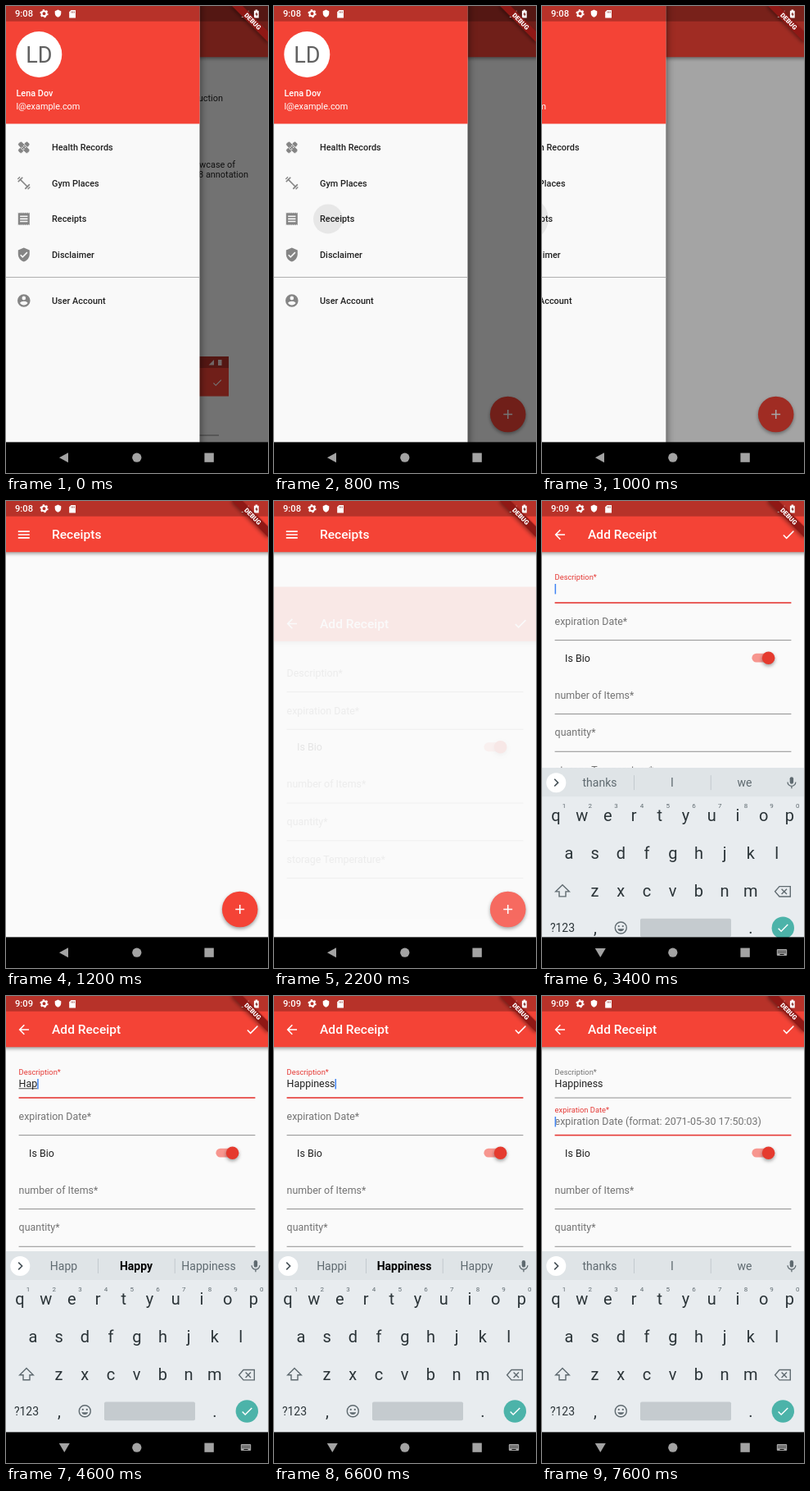
These frames come from a looping animation (320x569 px, 8000 ms). An HTML page:

```html
<!DOCTYPE html>
<html lang="en">
<head>
<meta charset="utf-8">
<title>Receipts app</title>
<style>
html, body { margin: 0; width: 100%; height: 100%; overflow: hidden; background: #000; }
svg { display: block; width: 100%; height: 100%; font-family: Roboto, sans-serif; }
text { white-space: pre; }
.shade { filter: drop-shadow(0 2px 2px rgba(0,0,0,.38)); }
.side { filter: drop-shadow(1px 0 5px rgba(0,0,0,.5)); }
</style>
</head>
<body>
<svg id="stage" viewBox="0 0 320 569"></svg>
<script>
const LOOP = 8000, STEP = 200;
const RED = '#f44336', PAPER = '#fafafa', INK = '#212121', GREY = '#737373', RULE = '#858585';
const LABEL = 12.44, SMALL = 9.33, DRAWER = 236.5;

const stage = document.getElementById('stage');
const $ = id => document.getElementById(id);
const set = (id, attrs) => { for (const k in attrs) $(id).setAttribute(k, attrs[k]); };
const show = (id, on) => set(id, { display: on ? 'inline' : 'none' });

const rect = (x, y, w, h, fill, more = '') => `<rect x="${x}" y="${y}" width="${w}" height="${h}" fill="${fill}" ${more}/>`;
const disc = (x, y, r, fill, more = '') => `<circle cx="${x}" cy="${y}" r="${r}" fill="${fill}" ${more}/>`;
const path = (d, fill, more = '') => `<path d="${d}" fill="${fill}" ${more}/>`;
const line = (d, color, width, more = '') => path(d, 'none', `stroke="${color}" stroke-width="${width}" ${more}`);
const text = (x, y, size, str, fill = INK, more = '') => `<text x="${x}" y="${y}" font-size="${size}" fill="${fill}" ${more}>${str}</text>`;
const MID = 'text-anchor="middle"', END = 'text-anchor="end"', MEDIUM = 'font-weight="500"';

// 24-unit icons, placed by their centre
const ICONS = {
  menu: 'M3 18h18v-2H3zm0-5h18v-2H3zm0-7v2h18V6z',
  back: 'M20 11H7.83l5.59-5.59L12 4l-8 8 8 8 1.41-1.41L7.83 13H20z',
  check: 'M9 16.17L4.83 12l-1.42 1.41L9 19 21 7l-1.41-1.41z',
  add: 'M19 13h-6v6h-2v-6H5v-2h6V5h2v6h6z',
  shield: 'M12 1L3 5v6c0 5.55 3.84 10.74 9 12 5.16-1.26 9-6.45 9-12V5z',
  verified: 'M12 1L3 5v6c0 5.55 3.84 10.74 9 12 5.16-1.26 9-6.45 9-12V5zm-2 16l-4-4 1.41-1.41L10 14.17l6.59-6.59L18 9z',
  receipt: 'M18 17H6v-2h12zm0-4H6v-2h12zm0-4H6V7h12zM3 22' + 'l1.5-1.5 1.5 1.5'.repeat(6) + 'V2' + 'l-1.5 1.5-1.5-1.5'.repeat(6) + 'z',
  account: 'M12 2a10 10 0 1 0 0 20 10 10 0 0 0 0-20zm0 3a3 3 0 1 1 0 6 3 3 0 0 1 0-6zm0 14.2c-2.5 0-4.71-1.28-6-3.22.03-1.99 4-3.08 6-3.08s5.97 1.09 6 3.08c-1.29 1.94-3.5 3.22-6 3.22z'
};
const place = (x, y, k, inner) => `<g transform="translate(${x} ${y}) scale(${k}) translate(-12 -12)">${inner}</g>`;
const icon = (name, x, y, fill = '#fff', k = .778) => place(x, y, k, path(ICONS[name], fill, 'fill-rule="evenodd"'));

const gear = disc(46.5, 9.2, 3, 'none', 'stroke="#fff" stroke-width="2"') +
  disc(46.5, 9.2, 4.4, 'none', 'stroke="#fff" stroke-width="1.5" stroke-dasharray="2.1 2.508"');

function statusIcons() {
  return gear + icon('shield', 63.5, 9.2, '#fff', .42) +
    path('M79.5 5h5.5v9.5h-7.8V7.3z', '#fff') + line('M80 6.5v2M81.7 6.5v2M83.4 6.5v2', '#8a2a22', .7) +
    path('M296.5 5v9h-9z', '#fff', 'opacity=".45"') + path('M293 8.5v5.5h-5.5z', '#fff') +
    path('M304.5 4.5h2.6v1.2h1.6v8.8h-5.8V5.7h1.6z', '#fff') +
    path('M306.3 7l-2 3.6h1.4V13l2.1-3.6h-1.5z', '#7a2019');
}

function appBar(title, left, right) {
  return rect(-4, -4, 328, 66.2, RED, 'class="shade"') + icon(left, 21.8, 41) +
    text(56, 46.3, 15.55, title, '#fff', MEDIUM) + (right ? icon(right, 301, 41) : '');
}

function home() {
  return rect(0, 0, 320, 569, PAPER) + appBar('Home', 'menu') +
    text(265, 116, 10.9, 'Introduction', INK, END) +
    text(280, 197, 10.9, 'A showcase of', INK, END) +
    text(296, 209, 10.9, 'annotation', INK, END) + text(241, 209, 10.9, '8', INK, END) +
    rect(48, 427, 224, 48.5, RED) + rect(48, 427, 224, 14, '#b73229') +
    path('M254 431v6.5h-6.5zM259 431h4.5v7H259z', '#fff', 'opacity=".85"') +
    icon('check', 258, 459, '#fff', .58) + rect(60, 522.6, 200, .9, '#777');
}

function receipts() {
  return rect(0, 0, 320, 569, PAPER) + appBar('Receipts', 'menu') +
    `<g class="shade">${disc(285.7, 497.5, 21.8, RED)}</g>` +
    disc(285.7, 497.5, 21.8, '#fff', 'id="press" opacity="0"') + icon('add', 285.7, 497.5);
}

const rule = (y, id) => rect(15.6, y, 288.8, .9, RULE, id ? `id="${id}"` : '');

function form() {
  return rect(0, 0, 320, 569, PAPER) + appBar('Add Receipt', 'back', 'check') +
    text(15.6, 105, LABEL, 'Description*', GREY, 'id="descLabel"') +
    text(15.6, 111, LABEL, '', INK, 'id="typed"') +
    rect(15.6, 112.4, 0, .8, INK, 'id="composing"') + rule(123.6, 'descRule') +
    text(15.6, 151, LABEL, 'expiration Date*', GREY, 'id="dateLabel"') +
    text(15.6, 157, LABEL, 'expiration Date (format: 2071-05-30 17:50:03)', GREY, 'id="hint" opacity="0"') +
    rule(169.2, 'dateRule') + rect(15.6, 101, 1.5, 12.4, '#4285f4', 'id="caret"') +
    text(28, 195.6, LABEL, 'Is Bio') +
    rect(256.4, 185.7, 26, 10.9, RED, 'rx="5.45" opacity=".55"') +
    `<g class="shade">${disc(276.6, 191.2, 7.8, '#e53a2e')}</g>` +
    text(15.6, 240.6, LABEL, 'number of Items*', GREY) + rule(259) +
    text(15.6, 286.4, LABEL, 'quantity*', GREY) + rule(304.8) +
    text(15.6, 332.2, LABEL, 'storage Temperature*', GREY) + rule(350.5);
}

const SOFT = '#858585';
const bandage = a => `<g transform="rotate(${a} 12 12)">${rect(1.5, 8, 21, 8, SOFT, 'rx="2.5" stroke="#f9f9f9" stroke-width="1"')}</g>`;

function drawer() {
  const healing = place(21.8, 172.3, .778, bandage(-45) + bandage(45) +
    [[9.6, 12], [14.4, 12], [12, 9.6], [12, 14.4]].map(p => disc(p[0], p[1], 1, '#f9f9f9')).join(''));
  const bell = place(21.8, 215.8, .778, '<g transform="rotate(45 12 12)">' +
    line('M3 12h18', SOFT, 2) + line('M4.2 7v10M19.8 7v10', SOFT, 2.2) + line('M.8 9.5v5M23.2 9.5v5', SOFT, 1.7) + '</g>');
  const rows = [['Health Records', 172.3], ['Gym Places', 215.8], ['Receipts', 259.4], ['Disclaimer', 303], ['User Account', 359]];
  return rect(-40, -10, DRAWER + 40, 589, '#f9f9f9', 'class="side"') + rect(0, 0, DRAWER, 143.5, RED) +
    disc(40.3, 59, 28, '#fff') + text(40.3, 68.8, 27, 'LD', '#616161', MID) +
    text(12.4, 110.3, 10.9, 'Lena Dov', '#fff', MEDIUM) + text(12.4, 126, 10.9, 'l@example.com', '#fff') +
    `<g clip-path="url(#row)">${disc(66, 259.4, 0, '#000', 'id="ripple" opacity=".07"')}</g>` +
    healing + bell + icon('receipt', 21.8, 259.4, SOFT) + icon('verified', 21.8, 303, SOFT) + icon('account', 21.8, 359, SOFT) +
    rows.map(([s, y]) => text(56, y + 3.9, 10.9, s, INK, MEDIUM)).join('') +
    rect(0, 330.1, DRAWER, .9, '#a8a8a8');
}

function keyboard() {
  const key = '#2b3438', dim = '#5f6a70';
  const keys = (str, x, y) => [...str].map((c, i) => text(x + i * 31.7, y, 20, c, key, MID)).join('');
  const digits = [...'1234567890'].map((c, i) => text(27 + i * 31.7, 360, 8, c, dim, MID)).join('');
  return rect(0, 311, 320, 221, '#e8ecef') + rect(0, 311, 320, 35, '#dfe4e7') +
    disc(17.3, 329, 12, '#fff') + line('M15.2 324.6l4.4 4.4-4.4 4.4', '#455056', 1.6) +
    rect(112, 320, .8, 18, '#bcc4c8') + rect(205.8, 320, .8, 18, '#bcc4c8') +
    [70.5, 159, 247.5].map((x, i) => text(x, 334.2, 14, '', dim, `${MID} id="word${i}"`)).join('') +
    rect(302.7, 322, 4.4, 8.6, dim, 'rx="2.2"') + line('M300 328.3a4.9 4.9 0 0 0 9.8 0M304.9 333.2v3', dim, 1.3) +
    keys('qwertyuiop', 17, 375.8) + digits + keys('asdfghjkl', 33, 421.6) + keys('zxcvbnm', 64.5, 467.5) +
    line('M25 453.5l-8.3 8.2h4.3v6h8v-6h4.3z', dim, 1.4) +
    line('M290 455.5h13.3v12.4H290l-5.4-6.2zM292.6 458.5l6.4 6.4M299 458.5l-6.4 6.4', dim, 1.4) +
    text(25, 511, 14, '?123', key, MID) + text(65, 513, 20, ',', key, MID) + text(255, 513, 20, '.', key, MID) +
    disc(96.3, 505.8, 7, 'none', `stroke="${dim}" stroke-width="1.4"`) +
    disc(93.8, 503.9, 1.1, dim) + disc(98.8, 503.9, 1.1, dim) + path('M92.3 507.2h8a4.2 4.2 0 0 1-8 0z', dim) +
    rect(120, 494.6, 111, 22.6, '#c5cbcf', 'rx="2"') +
    disc(294.3, 506, 13.7, '#4cb3a9') + icon('check', 294.3, 506, '#fff', .72);
}

function navBar() {
  const c = '#a3a3a3';
  return rect(0, 531.4, 320, 38, '#000') + path('M76 544.2v12L65 550.2z', c, 'id="backKey"') +
    path('M64.8 545h13l-6.5 11z', c, 'id="downKey"') + disc(159.8, 550.2, 5.6, c) + rect(242.4, 544.6, 11.4, 11.2, c) +
    `<g id="imeKey">${rect(286.8, 546, 12.4, 8, c, 'rx="1"')}${line('M288.3 548.2h9.4M288.3 550.3h9.4', '#000', 1.1, 'stroke-dasharray="1.2 .85"')}${line('M290.5 552.5h5', '#000', 1)}</g>`;
}

stage.innerHTML = '<defs><clipPath id="row"><rect x="0" y="237.6" width="236.5" height="43.6"/></clipPath></defs>' +
  `<g id="home">${home()}</g><g id="receipts">${receipts()}</g>` +
  rect(0, 0, 320, 569, '#000', 'id="scrim"') + `<g id="drawer">${drawer()}</g>` +
  `<g id="form">${form()}</g><g id="keyboard">${keyboard()}</g>` +
  rect(0, 0, 320, 18.7, '#000', 'opacity=".25"') + text(11, 13.2, 11.2, '', '#fff', MEDIUM + ' id="clock"') + statusIcons() +
  '<g transform="translate(320 0) rotate(45)">' + rect(-31.1, 21.8, 62.2, 9.33, '#8f1815', 'class="shade"') +
  text(0, 29.2, 7.9, 'DEBUG', '#fff', MID + ' font-weight="900"') + '</g>' + navBar();

const clamp = v => Math.max(0, Math.min(1, v));
const span = (t, from, to) => clamp((t - from) / (to - from));
const out = p => 1 - (1 - p) ** 3;

// CSS-style cubic curve, solved by bisection
function bezier(x1, y1, x2, y2) {
  const at = (a, b, s) => 3 * (1 - s) * (1 - s) * s * a + 3 * (1 - s) * s * s * b + s ** 3;
  return x => {
    let lo = 0, hi = 1;
    for (let i = 0; i < 24; i++) {
      const m = (lo + hi) / 2;
      if (at(x1, x2, m) < x) lo = m; else hi = m;
    }
    return at(y1, y2, hi);
  };
}
const fastOutSlowIn = bezier(.4, 0, .2, 1), easeIn = bezier(.42, 0, 1, 1);

const TYPED = [[0, ''], [4000, 'H'], [4400, 'Ha'], [4600, 'Hap'], [5000, 'Happ'], [5600, 'Happi'], [6600, 'Happiness']];
const WORDS = [
  [0, 'thanks', 'I', 'we'], [4000, 'H', 'Hi', 'Hey'], [4200, 'Ha', 'Have', 'Happy'], [4400, 'Hap', 'Happy', 'Happen'],
  [4600, 'Happ', 'Happy', 'Happiness'], [5200, 'Happi', 'Happiness', 'Happy'], [7400, 'thanks', 'I', 'we']
];
const latest = (list, t) => list.filter(e => e[0] <= t).pop();

function field(name, p, active, base, ruleY) {
  set(name + 'Label', { y: base - 9 * p, 'font-size': LABEL + (SMALL - LABEL) * p, fill: active ? '#e53935' : GREY });
  set(name + 'Rule', { y: active ? ruleY - .4 : ruleY, height: active ? 1.6 : .9, fill: active ? '#e53935' : RULE });
}

function draw(time) {
  const t = Math.floor(time / STEP) * STEP;

  // drawer closing over the list page
  const open = 1 - span(t, 888, 1199);
  show('home', t < 800);
  show('receipts', t >= 800);
  show('drawer', open > 0);
  set('drawer', { transform: `translate(${(open - 1) * DRAWER} 0)` });
  set('scrim', { opacity: .54 * open });
  set('ripple', { r: 27 * span(t, 400, 1000) });
  set('press', { opacity: t >= 1800 ? .13 : 0 });

  // form page fades upwards
  const enter = span(t, 2140, 2380);
  show('form', enter > 0);
  set('form', { opacity: easeIn(enter), transform: `translate(0 ${142.25 * (1 - fastOutSlowIn(enter))})` });

  const onDate = t >= 7400;
  field('desc', fastOutSlowIn(span(t, 3000, 3200)), t >= 3200 && !onDate, 105, 123.6);
  field('date', fastOutSlowIn(span(t, 7200, 7400)), onDate, 151, 169.2);
  set('hint', { opacity: span(t, 7200, 7600) });

  const typed = latest(TYPED, t)[1];
  $('typed').textContent = typed;
  const width = typed ? $('typed').getComputedTextLength() : 0;
  set('composing', { width: t < 6600 ? width : 0 });
  show('caret', t >= 3000 && !(t >= 6200 && t < 6600));
  set('caret', t < 7200 ? { x: 15.6 + width, y: 101 } : { x: 15.6, y: 147 });

  const up = out(span(t, 3100, 3600)), ime = t >= 3200;
  show('keyboard', ime);
  set('keyboard', { transform: `translate(0 ${221 * (1 - up)})` });
  show('backKey', !ime);
  show('downKey', ime);
  show('imeKey', ime);
  const words = latest(WORDS, t);
  for (let i = 0; i < 3; i++) {
    $('word' + i).textContent = words[i + 1];
    const strong = i === 1 && t >= 4000 && !onDate;
    set('word' + i, { 'font-weight': strong ? 700 : 400, fill: strong ? '#000' : '#5f6a70' });
  }
  $('clock').textContent = t < 3400 ? '9:08' : '9:09';
}

const start = performance.now();
function tick() {
  draw((performance.now() - start) % LOOP);
  requestAnimationFrame(tick);
}
tick();
</script>
</body>
</html>
```
